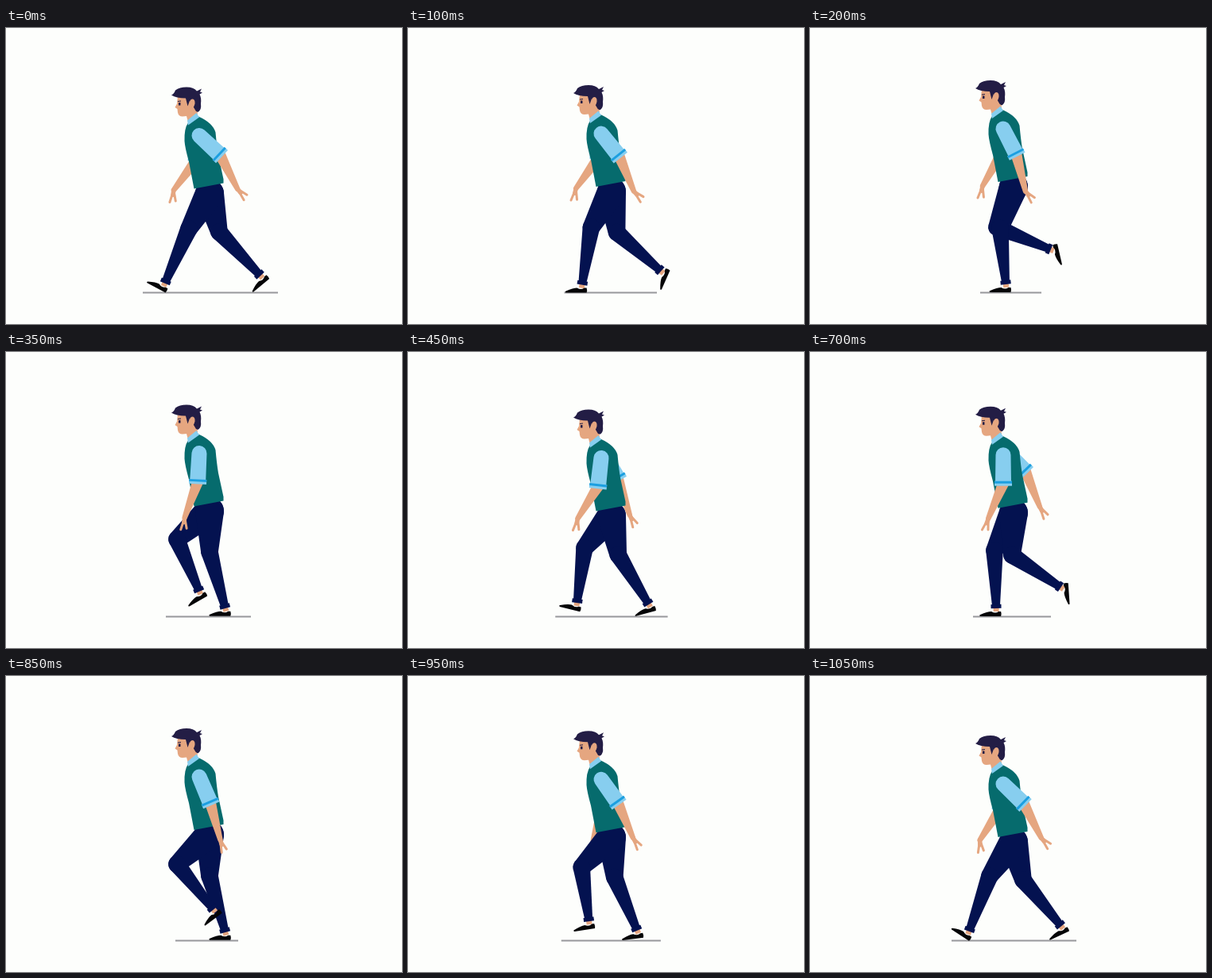
Recreate the animation shown at these times as an HTML page with a canvas. Size 498 px wide and 373 px high, loop 1100 ms.

```html
<!DOCTYPE html>
<html lang="en">
<head>
<meta charset="utf-8">
<title>Walk cycle</title>
<style>
html, body { margin: 0; height: 100%; overflow: hidden; background: #fdfefc; }
canvas { display: block; }
</style>
</head>
<body>
<canvas id="stage" width="498" height="373"></canvas>
<script>
const ctx = document.getElementById('stage').getContext('2d');
const LOOP = 1100, STEP = 50, HALF = LOOP / 2;
const SKIN = '#e5a680', HAIR = '#231d45', VEST = '#066b6d', SHIRT = '#87ceef',
      TRIM = '#1c9fe0', PANTS = '#041250', SHOE = '#050507', GROUND = '#97989c';

// Key poses: time, then values.
// Gait: knee x, y, ankle x, y, foot pitch (positive is toe down)
const GAIT = [
  [0, 230, 253, 201, 319, -28], [50, 230, 253, 206, 321, -4],
  [150, 232, 250, 234, 320, 0], [200, 239, 252, 246, 320, 0],
  [300, 256, 252, 275, 320, 0], [350, 256, 252, 275, 320, 0],
  [500, 268, 257, 314, 313, 25], [550, 268, 257, 318, 310, 40],
  [600, 268, 258, 317, 311, 40], [700, 254, 256, 313, 295, 94],
  [750, 235, 251, 300, 278, 103], [850, 215, 237, 259, 292, 37],
  [900, 215, 236, 242, 299, 30], [1050, 226, 252, 201, 319, -33]
];
// Arms: upper arm, forearm and hand angles from straight down
const NEAR_ARM = [
  [0, 47, 27, 40], [200, 27, 14, 37], [350, -3, -20, -8], [500, -6, -36, -12],
  [600, -4, -37, -15], [700, 0, -23, -19], [850, 23, 15, 16], [1050, 46, 27, 40]
];
const FAR_ARM = [
  [0, -10, -37, -8], [200, -8, -30, -12], [350, 12, 5, 8], [550, 47, 27, 40],
  [600, 47, 26, 40], [700, 44, 22, 28], [850, 12, 2, 5], [1050, -10, -33, 2]
];
// Per step: body drop, ground line left and right
const BOUNCE = [
  [0, 8.5, 172, 342], [50, 9, 187, 324], [150, 2.7, 205, 303], [200, 0, 214, 291],
  [300, 0, 213, 292], [350, 0.5, 201, 308], [500, 9, 178, 335]
];

// Smooth periodic interpolation through the keys
function sample(keys, time, period) {
  const n = keys.length, t = time % period;
  const at = i => {
    const lap = Math.floor(i / n), k = keys[i - lap * n];
    return [k[0] + lap * period, ...k.slice(1)];
  };
  let i = n - 1;
  while (keys[i][0] > t) i--;
  const [a, b, c, d] = [at(i - 1), at(i), at(i + 1), at(i + 2)];
  const span = c[0] - b[0], u = (t - b[0]) / span;
  return b.slice(1).map((p, j) => {
    const q = c[j + 1];
    const m = (q - a[j + 1]) / (c[0] - a[0]) * span;
    const w = (d[j + 1] - p) / (d[0] - b[0]) * span;
    return p + u * (m + u * (3 * (q - p) - 2 * m - w + u * (2 * (p - q) + m + w)));
  });
}

const rad = deg => deg * Math.PI / 180;
const reach = ([x, y], deg, len) => [x + len * Math.sin(rad(deg)), y + len * Math.cos(rad(deg))];

function fill(color, path) {
  ctx.fillStyle = color;
  ctx.fill(new Path2D(path));
}

// Tapered limb: hull of two circles
function limb(color, [x1, y1], r1, [x2, y2], r2) {
  const dir = Math.atan2(y2 - y1, x2 - x1);
  const side = Math.acos((r1 - r2) / Math.hypot(x2 - x1, y2 - y1));
  ctx.fillStyle = color;
  ctx.beginPath();
  ctx.arc(x1, y1, r1, dir + side, dir - side + 2 * Math.PI);
  ctx.arc(x2, y2, r2, dir - side, dir + side);
  ctx.fill();
}

function line(color, width, [x1, y1], [x2, y2], cap = 'butt') {
  ctx.strokeStyle = color;
  ctx.lineWidth = width;
  ctx.lineCap = cap;
  ctx.beginPath();
  ctx.moveTo(x1, y1);
  ctx.lineTo(x2, y2);
  ctx.stroke();
}

function placed([x, y], angle, draw) {
  ctx.save();
  ctx.translate(x, y);
  ctx.rotate(angle);
  draw();
  ctx.restore();
}

function leg(time, drop) {
  const [kx, ky, ax, ay, pitch] = sample(GAIT, time, LOOP);
  const knee = [kx, ky], ankle = [ax, ay];
  const shin = Math.atan2(ax - kx, ay - ky) * 180 / Math.PI;
  const heel = reach(ankle, shin, 5);
  line(SKIN, 7, ankle, reach(heel, shin, 2));
  placed(heel, rad(-pitch), () =>
    fill(SHOE, 'M6 2Q7 5 6 8H-20Q-22 7 -20 6Q-11 2 -6 2Q-1 5 3 2Z'));
  limb(PANTS, [256, 200 + drop], 18, knee, 10.8);
  limb(PANTS, knee, 10.8, reach(ankle, shin, -3), 5.2);
  placed(ankle, rad(-shin), () => fill(PANTS, 'M-6.5 -2H6.5V3H-6.5Z'));
}

function arm(keys, time, shoulder) {
  const [upper, fore, hand] = sample(keys, time, LOOP);
  const cuff = reach(shoulder, upper, 36), wrist = reach(cuff, fore, 48);
  limb(SKIN, cuff, 7, wrist, 3.2);
  line(SKIN, 5.5, wrist, reach(wrist, hand, 6), 'round');
  line(SKIN, 3, wrist, reach(wrist, hand + 18, 14), 'round');
  line(SKIN, 3, wrist, reach(wrist, hand - 10, 16), 'round');
  placed(shoulder, rad(-upper), () => {
    fill(SHIRT, 'M-9.5 0A9.5 9.5 0 0 1 9.5 0L10 34H-10Z');
    fill(SHIRT, 'M-11 33H11V39H-11Z');
    fill(TRIM, 'M-11 33H11V36H-11Z');
  });
}

function torso(drop) {
  placed([0, drop], 0, () => {
    fill(VEST, 'M229 111Q224 118 224.500 134Q225 142 230 160L236.500 194L273.500 187V182L267 152Q265 140 263.500 123Q260 111 242 103Z');
  });
}

function head(drop, blink) {
  placed([0, drop], 0, () => {
    fill(SKIN, 'M216 77L215 87L212.500 91.500L215.500 93.500L216 98Q217 103 222 103L227 102.500L229 110L241 101L239 82L230 76Z');
    fill(SHIRT, 'M228 108L239.500 98.500L243 104L229 114Z');
    fill(HAIR, 'M208 76Q211 75 213 70Q218 66 227 66Q236 66 240 71L246 68L244 72L247 73L243.500 75Q246 80 245 87Q246 94 242 97Q239 98 237.500 94L231 83L228.500 90L226 80Q214 80 208 76Z');
    fill(SKIN, 'M231 86Q231 81 235 81Q238 82 237.500 87Q236 93 233 93Q231 91 231 86Z');
    fill(HAIR, blink ? 'M216 87H220V88H216Z' : 'M217 85.500H219.500V89H217ZM216 83.500L220 83V84L216 84.500Z');
  });
}

function draw(time) {
  const [drop, left, right] = sample(BOUNCE, time, HALF);
  ctx.fillStyle = '#fdfefc';
  ctx.fillRect(0, 0, 498, 373);
  line(GROUND, 1.8, [left, 333.5], [right, 333.5]);
  arm(FAR_ARM, time, [246, 122 + drop]);
  leg(time + HALF, drop);
  leg(time, drop);
  torso(drop);
  head(drop, time === 600);
  arm(NEAR_ARM, time, [243, 127 + drop]);
}

const start = performance.now();
function tick() {
  const elapsed = (performance.now() - start) % LOOP;
  draw(Math.floor(elapsed / STEP) * STEP);
  requestAnimationFrame(tick);
}
tick();
</script>
</body>
</html>
```
